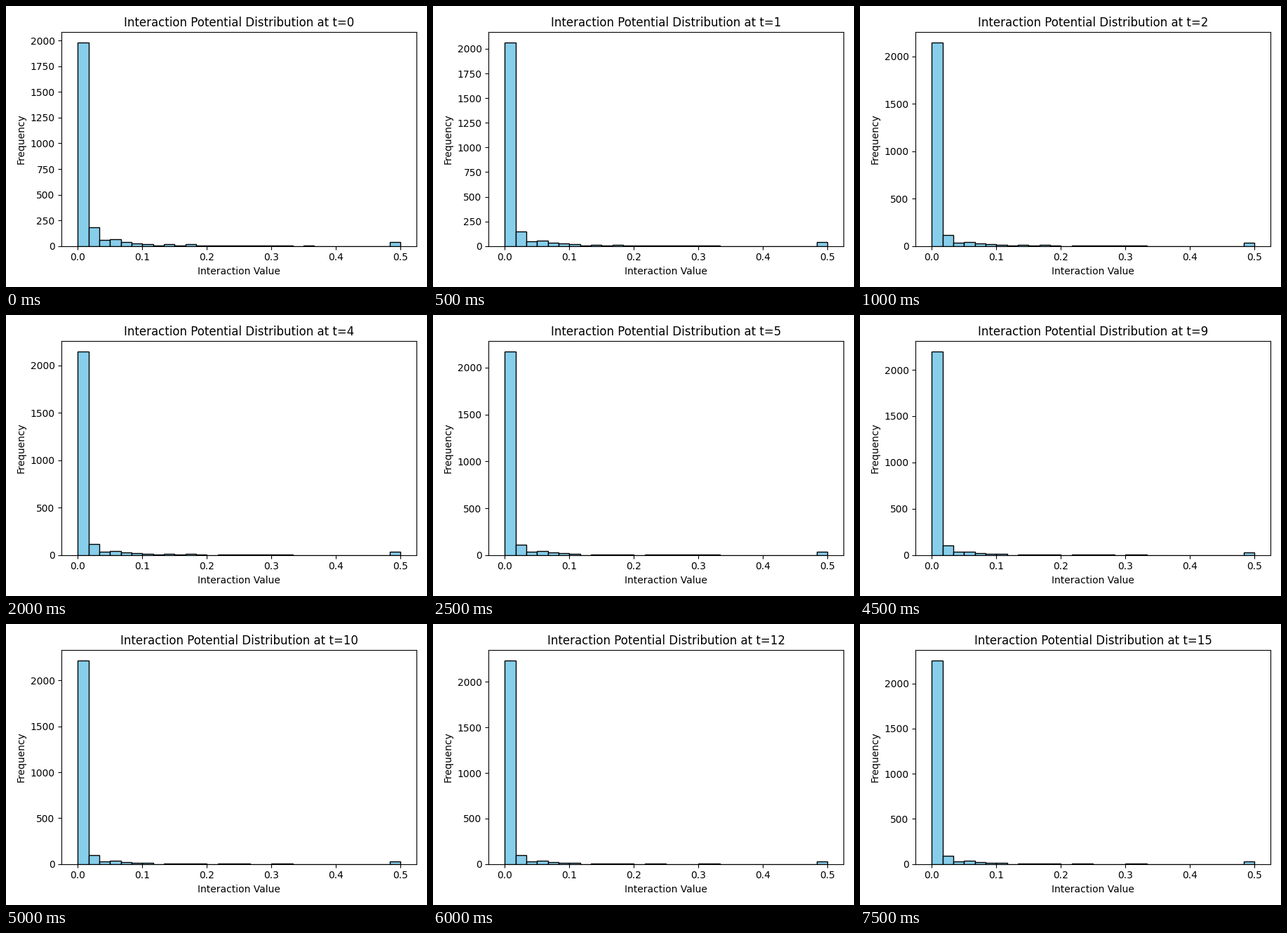
Animation of 600x400 px, one loop 8000 ms. Source, as a matplotlib script:

```python
import numpy as np
import matplotlib.pyplot as plt
from matplotlib.animation import FuncAnimation

STEPS, STEP_MS = 16, 500
BINS = 30
EDGES = np.linspace(0, 0.5, BINS + 1)
CENTERS = (EDGES[:-1] + EDGES[1:]) / 2

CHANGES = (1, 2, 5, 6, 10, 12, 15)       # steps at which the data moves
EMPTYING = (21, 12, 7, 17, 16, 15)       # one sparse bin runs dry per change
KEYS = (0, 2, 4, 7)                      # key points, in changes so far
START = np.array([183, 58, 69, 40, 28, 20])
SPARSE = 6


def bin_counts(t):
    stage = sum(t >= step for step in CHANGES)
    keep = np.interp(stage, KEYS, (1, 0.65, 0.57, 0.5))

    counts = np.zeros(BINS)
    counts[0] = np.interp(stage, KEYS, (1982, 2148, 2199, 2255))
    counts[1:7] = START * keep
    counts[-1] = 42 * np.sqrt(keep)

    # thin tail, with two fuller bins that level off
    counts[7:20] = counts[21] = SPARSE
    counts[[8, 10]] += 10 * max(0, 1 - stage / 4)
    counts[list(EMPTYING[:stage])] = 0
    return counts


fig, ax = plt.subplots(figsize=(6, 4), dpi=100)


def update(t):
    ax.clear()
    ax.hist(CENTERS, bins=EDGES, weights=bin_counts(t),
            color="skyblue", edgecolor="black")
    ax.set_title(f"Interaction Potential Distribution at t={t}")
    ax.set_xlabel("Interaction Value")
    ax.set_ylabel("Frequency")
    fig.tight_layout()
    return ax.patches


anim = FuncAnimation(fig, update, frames=STEPS, interval=STEP_MS,
                     repeat=True, repeat_delay=0, blit=False)
plt.show()
```
